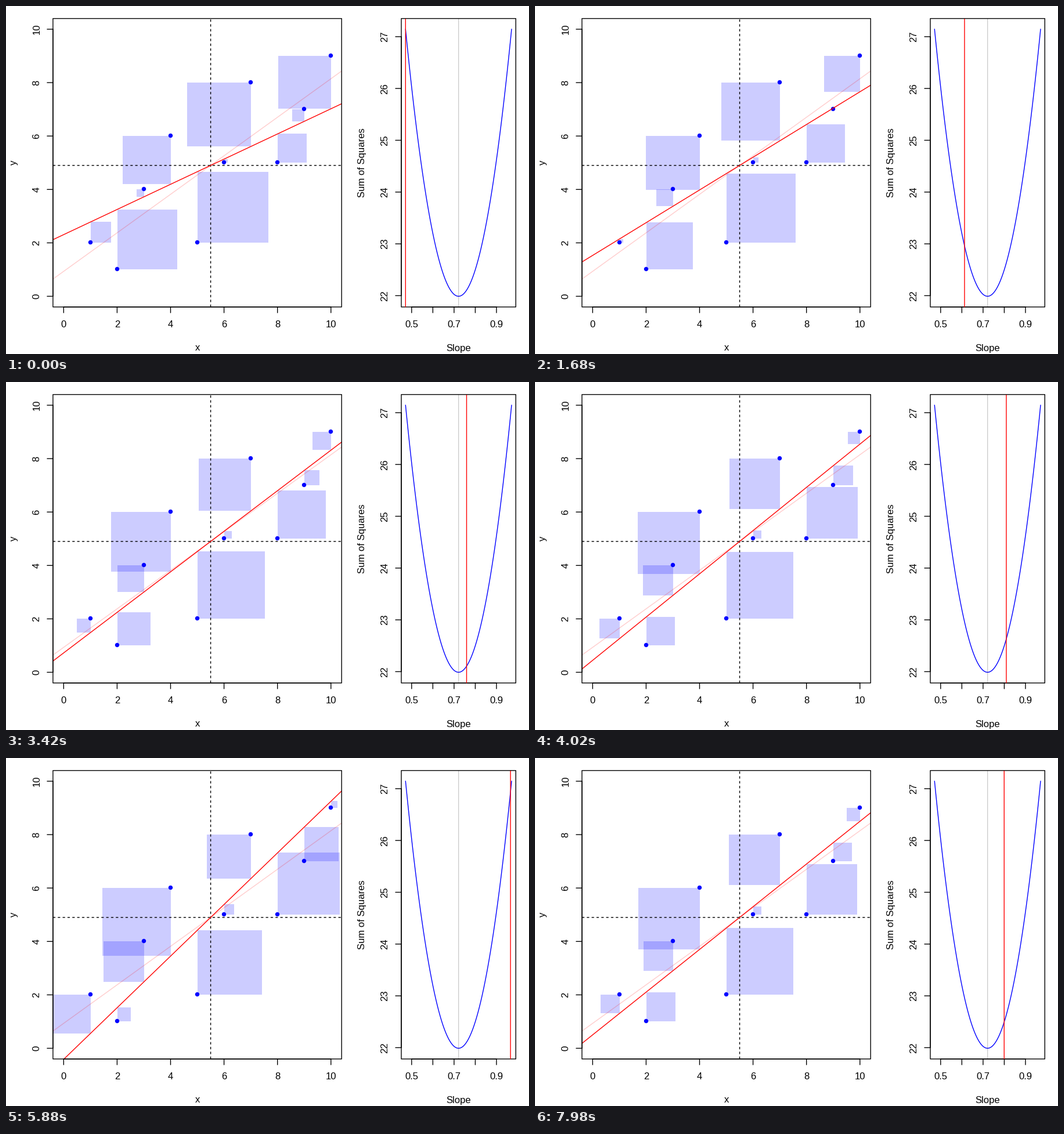
A matplotlib script for the animation above (8 s loop, 901 by 600 pixels).

```python
import numpy as np
import matplotlib
import matplotlib.pyplot as plt
from matplotlib.animation import FuncAnimation
from matplotlib.patches import Circle, Rectangle

matplotlib.rcParams["font.family"] = "Liberation Sans"
matplotlib.rcParams["font.size"] = 12

W, H, DPI = 901, 600, 100
TICK = 10
TOP, BOTTOM = 21.6, 518.9

# Regression data and least-squares fit
xs = np.arange(1, 11)
ys = np.array([2, 1, 4, 6, 2, 5, 8, 5, 7, 9])
mx, my = xs.mean(), ys.mean()
sxx = ((xs - mx) ** 2).sum()
best = ((xs - mx) * (ys - my)).sum() / sxx
sse_min = ((ys - my - best * (xs - mx)) ** 2).sum()

SPREAD = 0.25
STEPS = 99
HOLD = 3  # animation frames per slope step


def fit(x, slope):
    return my + slope * (x - mx)


def sse(slope):
    return sse_min + sxx * (slope - best) ** 2


fig = plt.figure(figsize=(W / DPI, H / DPI), dpi=DPI, facecolor="white")
ax = fig.add_axes([0, 0, 1, 1])
ax.set_xlim(0, W)
ax.set_ylim(H, 0)
ax.axis("off")


class Panel:
    """Plot region in pixels with its own data limits."""

    def __init__(self, left, right, xlim, ylim):
        self.left, self.right = left, right
        self.xlim, self.ylim = xlim, ylim
        self.frame = Rectangle((left, TOP), right - left, BOTTOM - TOP,
                               fill=False, ec="black", lw=1, snap=False,
                               joinstyle="round", zorder=6)
        ax.add_patch(self.frame)

    def px(self, x):
        a, b = self.xlim
        return self.left + (x - a) / (b - a) * (self.right - self.left)

    def py(self, y):
        a, b = self.ylim
        return BOTTOM - (y - a) / (b - a) * (BOTTOM - TOP)

    def clip(self, artist):
        artist.set_clip_path(self.frame)
        return artist

    def line(self, x, y, color, **kw):
        artist, = ax.plot(self.px(np.asarray(x)), self.py(np.asarray(y)),
                          color=color, lw=1, snap=False, **kw)
        return self.clip(artist)

    def x_axis(self, ticks, labels, title):
        pos = [self.px(t) for t in ticks]
        stroke([pos[0], pos[-1]], [BOTTOM, BOTTOM])
        for p, label in zip(pos, labels):
            stroke([p, p], [BOTTOM, BOTTOM + TICK])
            write(p, 554.5, label)
        write((self.left + self.right) / 2, 594.5, title)

    def y_axis(self, ticks, title):
        pos = [self.py(t) for t in ticks]
        stroke([self.left, self.left], [pos[0], pos[-1]])
        for p, t in zip(pos, ticks):
            stroke([self.left - TICK, self.left], [p, p])
            write(self.left - 23.5, p, str(t), 90)
        write(self.left - 63, (TOP + BOTTOM) / 2, title, 90)


def stroke(x, y):
    ax.plot(x, y, color="black", lw=1, snap=False,
            solid_capstyle="round", zorder=6)


def write(x, y, text, angle=0):
    if text:
        ax.text(x, y, text, rotation=angle, rotation_mode="anchor",
                ha="center", va="baseline", zorder=7)


LIM = (-0.4, 10.4)
low, high = best - SPREAD, best + SPREAD
sse_pad = 0.04 * (sse(low) - sse_min)
scatter = Panel(80.9, 578.2, LIM, LIM)
curve = Panel(681.0, 878.3, (low - 0.02, high + 0.02),
              (sse_min - sse_pad, sse(low) + sse_pad))

# Left panel
scatter.x_axis(range(0, 11, 2), [str(t) for t in range(0, 11, 2)], "x")
scatter.y_axis(range(0, 11, 2), "y")
ends = np.array(LIM)
for x, y in zip(xs, ys):
    center = (np.floor(scatter.px(x)) + 0.5, np.floor(scatter.py(y)) - 0.5)
    ax.add_patch(Circle(center, 3.7, fc="blue", ec="none", zorder=3))
scatter.line([mx, mx], LIM, "black", dashes=(3, 3), zorder=4)
scatter.line(LIM, [my, my], "black", dashes=(3, 3), zorder=4)
scatter.line(ends, fit(ends, best), "red", alpha=0.2, zorder=4)
fit_line = scatter.line(ends, fit(ends, low), "red", zorder=5)

squares = []
for _ in xs:
    square = Rectangle((0, 0), 0, 0, fc="blue", ec="none", alpha=0.2, zorder=2)
    ax.add_patch(square)
    squares.append(scatter.clip(square))

# Right panel
curve.x_axis([0.5, 0.6, 0.7, 0.8, 0.9], ["0.5", "", "0.7", "", "0.9"], "Slope")
curve.y_axis(range(22, 28), "Sum of Squares")
slopes = np.linspace(low, high, 100)
curve.line(slopes, sse(slopes), "blue", zorder=3)
curve.line([best, best], curve.ylim, "black", alpha=0.2, zorder=3)
marker = curve.line([low, low], curve.ylim, "red", zorder=8)


def update(i):
    k = i // HOLD
    slope = low + 2 * SPREAD / STEPS * min(k, 2 * STEPS - k)
    fit_line.set_ydata(scatter.py(fit(ends, slope)))
    marker.set_xdata([curve.px(slope)] * 2)
    for square, x, y in zip(squares, xs, ys):
        r = y - fit(x, slope)
        x0, x1 = sorted(np.round(scatter.px(v) + 0.2) for v in (x, x - r))
        y0, y1 = sorted(np.round(scatter.py(v) - 0.2) for v in (y, y - r))
        square.set_bounds(x0, y0, x1 - x0, y1 - y0)
    return [fit_line, marker, *squares]


anim = FuncAnimation(fig, update, frames=400, interval=20, repeat=True,
                     repeat_delay=0, blit=False)
plt.show()
```
